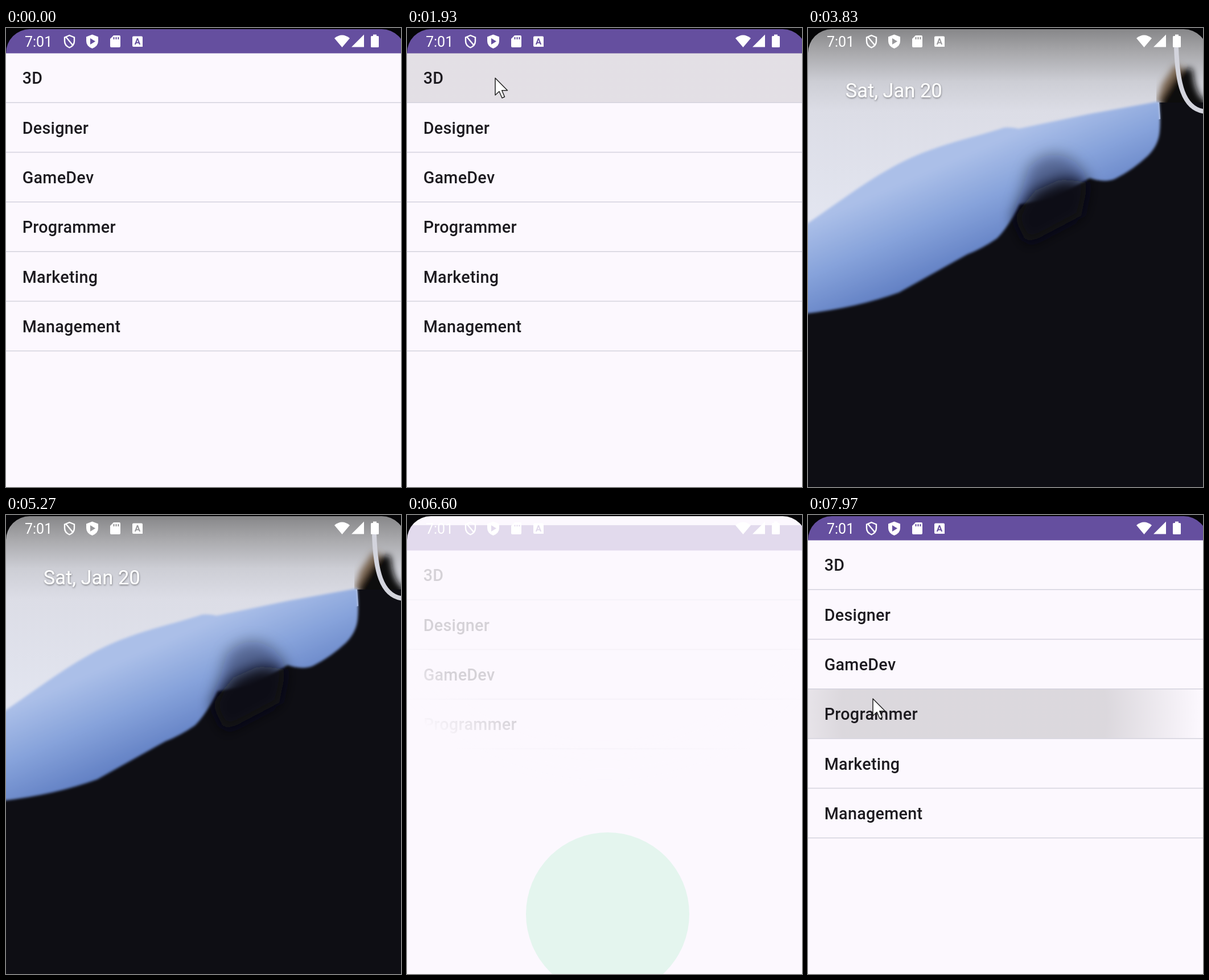
An HTML page for the animation above (8 s loop, 694 px wide and 807 px high).

```html
<!DOCTYPE html>
<html lang="en">
<head>
<meta charset="utf-8">
<title>Job list app</title>
<style>
  html, body { margin: 0; width: 100%; height: 100%; overflow: hidden; background: #050507; }
  svg { display: block; width: 100%; height: 100%; }
  text { font-family: Roboto, "Noto Sans", sans-serif; white-space: pre; }
  #rows text { font-size: 28.7px; font-weight: 500; letter-spacing: .3px; fill: #1d1b20; }
  #roles text { font-size: 28.7px; fill: #161618; }
</style>
</head>
<body>
<svg viewBox="0 0 694 807">
  <defs>
    <linearGradient id="sky" x1="0" y1="0" x2="0" y2="350" gradientUnits="userSpaceOnUse">
      <stop offset="0" stop-color="#858587"/>
      <stop offset=".12" stop-color="#a8a8ab"/>
      <stop offset=".27" stop-color="#cdced5"/>
      <stop offset=".42" stop-color="#dcdde6"/>
      <stop offset="1" stop-color="#e3e6f1"/>
    </linearGradient>
    <linearGradient id="wing" x1="0" y1="343" x2="68" y2="499" gradientUnits="userSpaceOnUse">
      <stop offset="0" stop-color="#abbfe8"/>
      <stop offset=".5" stop-color="#87a3db"/>
      <stop offset="1" stop-color="#6482c5"/>
    </linearGradient>
    <radialGradient id="ink" gradientUnits="userSpaceOnUse">
      <stop offset=".58" stop-color="#000"/>
      <stop offset="1" stop-color="#000" stop-opacity="0"/>
    </radialGradient>
    <radialGradient id="hole" cx="347" cy="0" r="1714" gradientUnits="userSpaceOnUse">
      <stop offset=".8" stop-color="#fff"/>
      <stop offset="1" stop-color="#fff" stop-opacity="0"/>
    </radialGradient>
    <mask id="reveal" maskUnits="userSpaceOnUse" x="-100" y="0" width="900" height="807">
      <rect x="-100" width="900" height="807" fill="url(#hole)"/>
    </mask>
    <filter id="soft" x="-10%" y="-10%" width="120%" height="120%"><feGaussianBlur stdDeviation="2"/></filter>
    <filter id="burn" x="-60%" y="-60%" width="220%" height="220%"><feGaussianBlur stdDeviation="6"/></filter>
    <filter id="smoke" x="-60%" y="-60%" width="220%" height="220%"><feGaussianBlur stdDeviation="13"/></filter>
    <filter id="shade" x="-10%" y="-30%" width="120%" height="170%">
      <feDropShadow dx="0.5" dy="1.5" stdDeviation="1.4" flood-color="#000" flood-opacity=".45"/>
    </filter>
    <clipPath id="above"><rect x="612" width="82" height="131"/></clipPath>
  </defs>

  <g id="home">
    <rect width="694" height="807" fill="#0e0e14"/>
    <path d="M0 0H694V131H617L619 160L345 230L0 400Z" fill="url(#sky)"/>
    <g clip-path="url(#above)" filter="url(#burn)">
      <path d="M612 131L622 98L644 66H656V131Z" fill="#6b5338" opacity=".8"/>
      <path d="M620 160V128L640 96L656 76Q668 66 676 74Q680 120 700 128V160Z" fill="#0e0c0c"/>
    </g>
    <path d="M-20 357L0 343C70 295 130 248 200 220C250 200 300 190 345 175Q357 174 370 177L500 150L617 129Q620 160 618 182Q616 206 597 225Q570 250 540 265Q522 273 495 264L430 300L372 310Q352 350 332 370Q306 388 280 398L160 465Q80 494 -20 504Z" fill="url(#wing)" filter="url(#soft)"/>
    <g fill="#0e0e14" filter="url(#smoke)">
      <path d="M366 318L388 245Q425 205 470 236L492 262L430 310Z" opacity=".38"/>
      <path d="M362 332L400 286L445 266L492 272L480 330L385 380Z"/>
    </g>
    <path d="M647 34C649 95 658 143 698 147" fill="none" stroke="#d3d4dd" stroke-width="8"/>
    <text id="date" x="65.700" y="121.500" font-size="34.500" fill="#fff" filter="url(#shade)">Sat, Jan 20</text>
  </g>

  <g id="splash">
    <rect id="pane" width="694" height="1318" fill="#fcf8fe"/>
    <circle id="badge" cx="352.5" cy="701.5" fill="#3ddc84"/>
  </g>

  <g id="list" mask="url(#reveal)">
    <g id="listBody">
      <rect width="800" height="807" fill="#fcf8fe"/>
      <rect width="800" height="44.5" fill="#654f9f"/>
      <rect id="ripple" width="800" height="87" fill="url(#ink)"/>
      <g id="rows"></g>
    </g>
  </g>

  <g id="detail">
    <rect width="694" height="1318" fill="#fcfcfd"/>
    <rect width="694" height="44.5" fill="#654f9f"/>
    <g id="roles"></g>
  </g>

  <g id="status">
    <text x="33" y="33" font-size="25">7:01</text>
    <path d="M111.5 13L120 16.500V23Q120 31 111.500 34.500Q103 31 103 23V16.500ZM105 15.500L118 31" fill="none" stroke="currentColor" stroke-width="2.400"/>
    <path fill-rule="evenodd" d="M151.500 11.500L162 15.500V23Q162 32 151.500 36Q141 32 141 23V15.500ZM148 18V29L157 23.500Z"/>
    <path fill-rule="evenodd" d="M189 13H199Q201 13 201 15V32Q201 34 199 34H185Q183 34 183 32V19ZM188.500 16V20H190.500V16ZM192.500 16V20H194.500V16ZM196.500 16V20H198.500V16Z"/>
    <path fill-rule="evenodd" d="M224 14.500H238Q240 14.500 240 16.500V33H224Q222 33 222 31V16.500Q222 14.500 224 14.500ZM230 18L225.800 29H228.200L229 26.700H233L233.800 29H236.200L232 18ZM231 20.800L232.300 24.800H229.700Z"/>
    <path d="M577 18Q590.500 7 604 18L590.500 34Z"/>
    <path d="M629 11.500V33.500H607Z"/>
    <path d="M645 11.500H651V14H653.500Q655 14 655 15.500V32.500Q655 34 653.500 34H642.500Q641 34 641 32.500V15.500Q641 14 642.500 14H645Z"/>
  </g>

  <path id="cursor" d="M0 0V30L7 23.500L12 35L16.500 33L11.700 21.800H21.500Z" fill="#fff" stroke="#222" stroke-width="1.500" stroke-linejoin="round"/>
  <path fill="#050507" fill-rule="evenodd" d="M0 0H702V44H0ZM0 44A42 42 0 0 1 42 2H660A42 42 0 0 1 702 44Z"/>
</svg>
<script>
const $ = id => document.getElementById(id);
const set = (id, attrs) => { for (const k in attrs) $(id).setAttribute(k, attrs[k]); };
const show = (id, on) => { $(id).style.display = on ? '' : 'none'; };
const clamp = x => Math.max(0, Math.min(1, x));
const lerp = (a, b, p) => a + (b - a) * p;
const span = (t, from, to) => clamp((t - from) / (to - from));

const LOOP = 8000, ROW = 87.3, TOP = 44;
const REVEAL = 6517, REVEAL_END = 7117;

const label = (x, y, s) => `<text x="${x}" y="${y}">${s}</text>`;
$('rows').innerHTML = ['3D', 'Designer', 'GameDev', 'Programmer', 'Marketing', 'Management']
  .map((s, i) => label(28.7, 98.4 + i * ROW, s) +
    `<rect y="${130.4 + i * ROW}" width="800" height="1.6" fill="#d6d5df"/>`).join('');
$('roles').innerHTML = ['3D Modeler', 'Texture artist', 'Rigger', 'Animator', 'VFX Artist',
  '3D Generalist', 'Visualizer', 'Environment Artist', 'Character Artist', 'Hard surface Artist']
  .map((s, i) => label(14.5, 85.7 + i * 33.65, s)).join('');

// Cubic timing curve, solved by bisection
function bezier(x1, y1, x2, y2) {
  const at = (a, b, s) => 3 * a * s * (1 - s) ** 2 + 3 * b * s * s * (1 - s) + s ** 3;
  return x => {
    if (x <= 0 || x >= 1) return clamp(x);
    let lo = 0, hi = 1;
    for (let i = 0; i < 24; i++) {
      const mid = (lo + hi) / 2;
      if (at(x1, x2, mid) < x) lo = mid; else hi = mid;
    }
    return at(y1, y2, lo);
  };
}
const alphaOut = bezier(0, 0, .8, 1);
const radiusOut = bezier(0, 0, .4, 1);
const shiftUp = bezier(0, 0, 0, 1);
const quickStart = bezier(.3, 0, .8, .15);
const slowEnd = bezier(.05, .7, .1, 1);
const slide = x => x < 1 / 6 ? .4 * quickStart(6 * x) : .4 + .6 * slowEnd((x - 1 / 6) * 1.2);

// Scale towards the launcher icon below the visible area
const zoom = s => `translate(600 1318) scale(${s}) translate(-600 -1318)`;

function drawRipple(t) {
  const second = t > 2400;
  const age = t - (second ? 7800 : 1570);
  show('ripple', age > 0);
  if (age <= 0) return;
  const y = TOP + (second ? 3 : 0) * ROW;
  set('ripple', { y, opacity: lerp(.13, .1, span(age, 220, 340)) * span(age, 0, 80) });
  set('ink', { cx: lerp(second ? 114 : 155, 347, clamp(age / 225)), cy: y + ROW / 2, r: 60 + 2 * age });
}

function drawCursor(t) {
  let x, y;
  if (t < 2830) {
    const enter = 1 - (1 - span(t, 1100, 1330)) ** 2;
    const leave = span(t, 2600, 2830) ** 2;
    x = lerp(lerp(692, 155, enter), 455, leave);
    y = lerp(lerp(94, 88, enter) - 10 * Math.sin(Math.PI * enter), 45, leave);
  } else {
    const enter = 1 - (1 - span(t, 7330, 7500)) ** 2;
    x = lerp(693, 114, enter);
    y = lerp(460, 323, enter);
  }
  show('cursor', (t >= 1100 && t < 2830) || t >= 7330);
  set('cursor', { transform: `translate(${x} ${y})` });
}

function draw(t) {
  const push = slide(span(t, 2000, 2400));
  const close = span(t, 3660, 3825);
  const reveal = span(t, REVEAL, REVEAL_END);

  show('home', t >= 3660 && t < 6300);
  set('date', { opacity: span(t, 3700, 3825) });

  show('detail', t >= 2000 && close < 1);
  set('detail', {
    opacity: span(t, 2050, 2133) * (1 - close),
    transform: close > 0 ? zoom(1 - .5 * close * close) : `translate(${69.4 * (1 - push)} 0)`
  });

  show('splash', t >= 5970 && t < REVEAL_END);
  const gap = .3 * Math.exp(-(t - 5970) / 23);
  set('pane', { transform: zoom(1 - gap) });
  set('badge', { r: Math.max(0, 143.5 * (1 - 1.9 * gap)), opacity: 1 - span(t, 6485, 6618) });

  const first = t < 2400;
  show('list', first || t >= REVEAL);
  set('list', { opacity: first ? 1 : alphaOut(reveal) });
  set('hole', { r: first ? 1714 : Math.max(1, 1714 * radiusOut(reveal)) });
  set('listBody', {
    transform: first ? `translate(${-69.4 * push} 0)` : `translate(0 ${38 * (1 - shiftUp(reveal))})`
  });

  const dark = span(t, 5965, 6025) - span(t, 6500, 6590);
  const tint = `rgb(${[66, 65, 69].map(c => Math.round(lerp(255, c, dark))).join()})`;
  set('status', { fill: tint, color: tint });

  drawRipple(t);
  drawCursor(t);
}

const start = performance.now();
function tick() {
  draw((performance.now() - start) % LOOP);
  requestAnimationFrame(tick);
}
tick();
</script>
</body>
</html>
```
